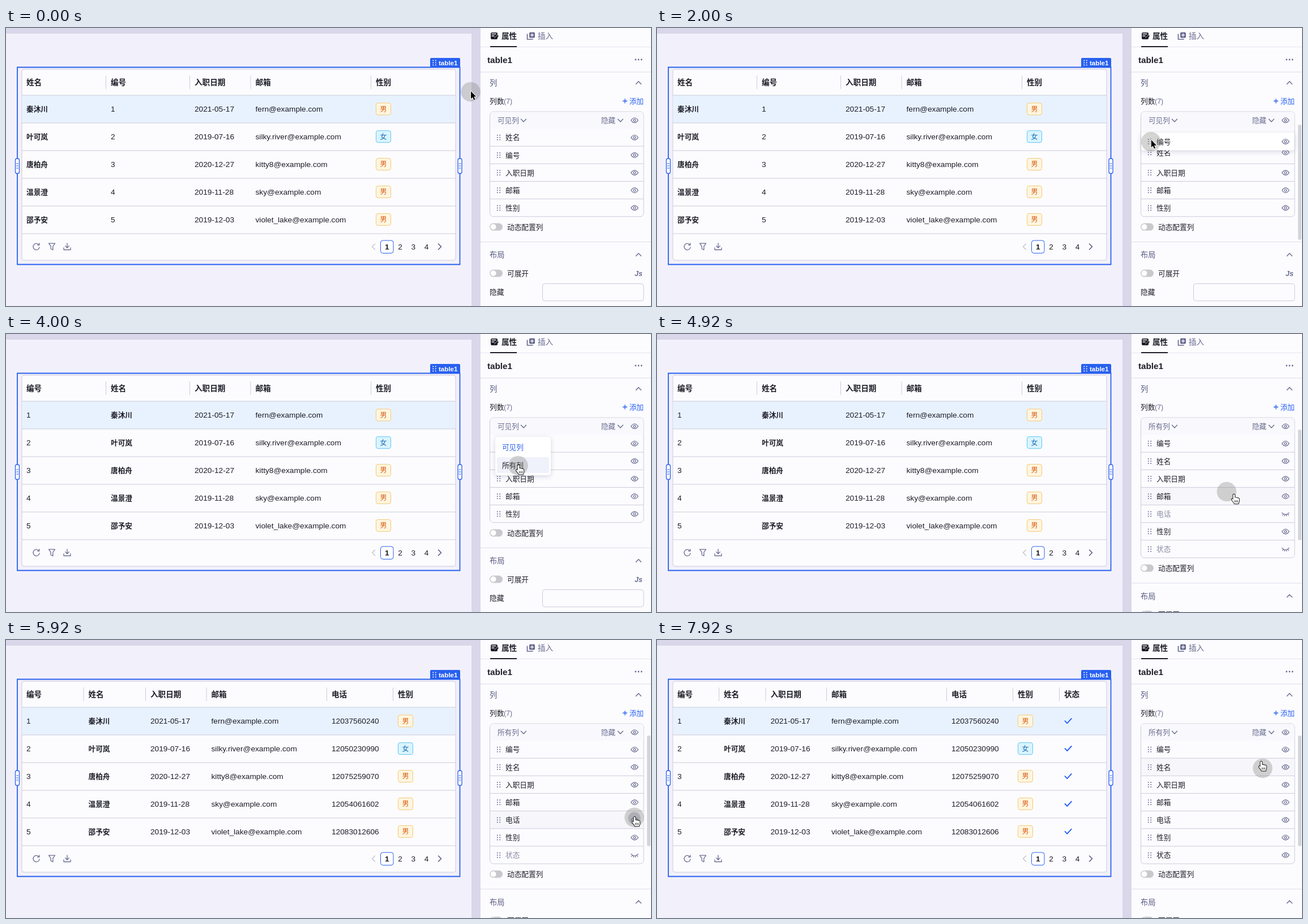
These frames come from a looping animation (1139x492 px, 8 s). An HTML page with a canvas:

```html
<!DOCTYPE html>
<html lang="zh-CN">
<head>
<meta charset="utf-8">
<title>table1</title>
<style>
  html, body { margin: 0; width: 100%; height: 100%; overflow: hidden; }
  canvas { display: block; width: 100vw; height: 100vh; }
</style>
</head>
<body>
<canvas id="stage"></canvas>
<script>
const W = 1139, H = 492, LOOP = 8000;
const FONT = '"Liberation Sans", "Noto Sans CJK SC", "Noto Sans CJK", sans-serif';
const BLUE = '#2860f0', INK = '#1d1d27', MUTED = '#6a6c90', FAINT = '#8b8ca3', LINE = '#cbcbd9', PAPER = '#fcfcff';

const canvas = document.getElementById('stage');
const ctx = canvas.getContext('2d');
const ratio = window.devicePixelRatio || 1;
canvas.width = W * ratio;
canvas.height = H * ratio;

// Moments (ms) at which the interface reacts
const AT = { grab: 1670, drop: 2300, reorder: 2420, open: 3150, pick: 4200, phone: 5670, phoneColumn: 5750, status: 7170 };

const ROW = 31.15, LIST_TOP = 178;
const LABELS = { name: '姓名', id: '编号', date: '入职日期', mail: '邮箱', phone: '电话', sex: '性别', status: '状态' };
const PEOPLE = [
  ['秦沐川', '2021-05-17', 'fern@example.com', '12037560240', '男'],
  ['叶可岚', '2019-07-16', 'silky.river@example.com', '12050230990', '女'],
  ['唐柏舟', '2020-12-27', 'kitty8@example.com', '12075259070', '男'],
  ['温景澄', '2019-11-28', 'sky@example.com', '12054061602', '男'],
  ['邵予安', '2019-12-03', 'violet_lake@example.com', '12083012606', '男'],
].map(([name, date, mail, phone, sex], i) => ({ id: String(i + 1), name, date, mail, phone, sex }));

const LAYOUTS = {
  start:  { name: 36, id: 185, date: 333, mail: 440.5, sex: 653 },
  moved:  { id: 36, name: 185, date: 333, mail: 440.5, sex: 653 },
  phone:  { id: 36, name: 145.5, date: 255, mail: 362.5, phone: 575, sex: 692 },
  status: { id: 36, name: 118, date: 200.5, mail: 308, phone: 520, sex: 637, status: 719 },
};

const EASE = {
  in: u => u * u,
  out: u => 1 - (1 - u) ** 2,
  both: u => u * u * (3 - 2 * u),
};
// Pointer path: time, x, y, easing of the way there
const PATH = [
  [0, 821, 112], [500, 821, 112], [970, 872, 222, 'both'],
  [1670, 872, 222], [2150, 873, 191, 'both'],
  [2480, 873, 191], [2900, 910.5, 172, 'both'],
  [3250, 910.5, 172], [3650, 905, 232, 'both'],
  [4500, 905, 232], [4920, 1018.5, 283.5, 'in'], [5350, 1110, 313, 'out'],
  [6250, 1110, 313], [6850, 1110, 373, 'both'],
  [7270, 1110, 373], [7920, 1067, 215, 'in'], [8000, 1067, 215],
];

function pointerAt(t) {
  const i = Math.max(1, PATH.findIndex(key => key[0] >= t));
  const [t0, x0, y0] = PATH[i - 1], [t1, x1, y1, ease = 'both'] = PATH[i];
  const u = EASE[ease](Math.min(1, Math.max(0, (t - t0) / (t1 - t0))));
  return { x: x0 + (x1 - x0) * u, y: y0 + (y1 - y0) * u };
}

function text(str, x, cy, size, color = INK, weight = 400, align = 'left') {
  ctx.font = `${weight} ${size}px ${FONT}`;
  ctx.textAlign = align;
  ctx.fillStyle = color;
  ctx.fillText(str, x, cy + size * 0.365);
}

function rect(x, y, w, h, color) {
  ctx.fillStyle = color;
  ctx.fillRect(x, y, w, h);
}

function box(x, y, w, h, r, fill, stroke, width = 1) {
  ctx.beginPath();
  ctx.roundRect(x, y, w, h, r);
  if (fill) { ctx.fillStyle = fill; ctx.fill(); }
  if (stroke) { ctx.strokeStyle = stroke; ctx.lineWidth = width; ctx.stroke(); }
}

function disc(x, y, r, color) {
  ctx.beginPath();
  ctx.arc(x, y, r, 0, Math.PI * 2);
  ctx.fillStyle = color;
  ctx.fill();
}

function icon(d, x, y, stroke, width = 1.3, fill) {
  const path = new Path2D(d);
  ctx.save();
  ctx.translate(x, y);
  ctx.lineWidth = width;
  ctx.lineJoin = ctx.lineCap = 'round';
  ctx.strokeStyle = stroke;
  ctx.stroke(path);
  if (fill) { ctx.fillStyle = fill; ctx.fill(path); }
  ctx.restore();
}

function grip(x, y, color) {
  for (let i = 0; i < 6; i++) disc(x + (i % 2 ? 2.2 : -2.2), y + (Math.floor(i / 2) - 1) * 4, 1, color);
}

function eye(x, y, open) {
  if (open) {
    icon('M-6.3 0Q0 -8.6 6.3 0Q0 8.6 -6.3 0Z', x, y, MUTED, 1.2);
    icon('M-2 0A2 2 0 1 0 2 0A2 2 0 1 0 -2 0Z', x, y, MUTED, 1.2);
  } else {
    icon('M-6.3 -2Q0 4.6 6.3 -2M-4 .4L-5.3 2.6M-1.3 1.4L-1.8 3.6M1.3 1.4L1.8 3.6M4 .4L5.3 2.6', x, y, MUTED, 1.2);
  }
}

const chevronDown = (x, y) => icon('M-4.5 -2.2L0 2.4L4.5 -2.2', x, y, MUTED, 1.4);
const chevronUp = (x, y) => icon('M-4.5 2.2L0 -2.4L4.5 2.2', x, y, MUTED, 1.4);

function toggle(y) {
  box(854, y - 6.5, 23, 13, 6.5, '#c9c9cd');
  disc(860.5, y, 5, '#fff');
}

function genderTag(value, x, cy) {
  const [fill, edge, ink] = value === '男' ? ['#fff6df', '#f6c878', '#d85a14'] : ['#daf4ff', '#62c6f3', '#1268b4'];
  box(x + .5, cy - 10.5, 26, 21, 3.5, fill, edge);
  text(value, x + 13.5, cy, 12, ink, 400, 'center');
}

function drawCell(key, person, x, cy) {
  if (key === 'sex') genderTag(person.sex, x, cy);
  else if (key === 'status') icon('M-5.5 0L-1.7 4L5.8 -4.2', x + 7, cy, BLUE, 1.9);
  else if (key === 'name') text(person.name, x, cy, 12.7, INK, 700);
  else text(person[key], x, cy, 13.7);
}

function drawTable(layout) {
  rect(0, 0, W, H, '#d9d7e9');
  rect(0, 10, 822, H, '#f2f1fb');

  box(28, 73, 766, 338, 4, PAPER, LINE);
  rect(28.5, 119, 765, 49, '#e8f2ff');
  for (let i = 0; i < 6; i++) rect(28, 118.5 + i * 49, 766, 1, LINE);

  for (const [key, x] of Object.entries(layout)) {
    if (x > 36) rect(x - 9, 84, 1, 24, LINE);
    text(LABELS[key], x, 96, 13.6, INK, 700);
    PEOPLE.forEach((person, i) => drawCell(key, person, x, 143.3 + i * 48.9));
  }

  icon('M4.7 -3.2A5.6 5.6 0 1 0 5.6 1M5.3 -6V-2.8H2', 53.5, 387, MUTED);
  icon('M-5.5 -5.8H5.5L1.8 -.6V5.8L-1.8 3.8V-.6Z', 81, 387, MUTED);
  icon('M0 -6V1.8M-3.4 -1.4L0 2L3.4 -1.4M-6 2V5.5H6V2', 108, 387, MUTED);
  icon('M2.5 -5L-2.5 0L2.5 5', 649, 387, '#c3c3cf', 1.4);
  icon('M-2.5 -5L2.5 0L-2.5 5', 766, 387, '#55577f', 1.5);
  box(661.5, 376, 22.5, 22.5, 4, '#fff', BLUE);
  ['1', '2', '3', '4'].forEach((n, i) => text(n, 672.7 + i * 23.3, 387, 13.7, INK, i ? 400 : 700, 'center'));

  box(20, 69.5, 781.5, 349, 0, null, BLUE, 1.8);
  box(749, 53, 53, 17, [2, 2, 0, 0], BLUE);
  grip(756.5, 61.5, '#fff');
  text('table1', 764, 61.5, 11.6, '#fff', 700);
  for (const x of [20, 801.5]) {
    box(x - 3.5, 231, 7, 26.5, 3, '#fff', BLUE, 1.3);
    for (const y of [240, 244, 248]) rect(x - 2, y - .5, 4, 1, BLUE);
  }
}

function drawListRow(key, y, hidden) {
  grip(870, y, MUTED);
  text(LABELS[key], 882, y, 12.7, hidden ? FAINT : INK);
  eye(1110, y, !hidden);
}

function drawList(t, pointer) {
  const expanded = t >= AT.pick;
  const dragging = t >= AT.grab && t < AT.drop;
  const first = t < AT.drop ? ['name', 'id'] : ['id', 'name'];
  const keys = [...first, 'date', 'mail', ...(expanded ? ['phone', 'sex', 'status'] : ['sex'])];
  const bottom = LIST_TOP + keys.length * ROW;
  const hidden = key => (key === 'phone' && t < AT.phone) || (key === 'status' && t < AT.status);
  const menuOpen = t >= AT.open && !expanded;
  const hovered = pointer.x > 855 && !dragging && !menuOpen ? Math.floor((pointer.y - LIST_TOP) / ROW) : -1;

  box(854.5, 148, 271.5, bottom - 148, 6, PAPER, LINE);
  box(855, 148.5, 270.5, 29.5, [5, 5, 0, 0], '#f9f9fd');
  text(expanded ? '所有列' : '可见列', 868, 163.3, 12.6, MUTED);
  chevronDown(914, 163.5);
  text('隐藏', 1051, 163.3, 12.6, MUTED);
  chevronDown(1085, 163.5);
  eye(1110, 163.3, true);

  keys.forEach((key, i) => {
    const top = LIST_TOP + i * ROW;
    if (i === hovered) rect(855, top, 270.5, ROW - 1, '#f7f7fb');
    if (i) rect(854.5, top - .5, 271.5, 1, LINE);
    if (dragging && key === 'id') return;
    const shift = dragging && key === 'name' ? ROW * EASE.both(Math.min(1, Math.max(0, (t - 1850) / 200))) : 0;
    drawListRow(key, top + 15.8 + shift, hidden(key));
  });

  if (dragging) {
    const y = LIST_TOP + ROW + pointer.y - 222;
    shadowed(() => box(855, y, 270.5, ROW, 3, '#fff'));
    drawListRow('id', y + 15.8, false);
  }
  return bottom;
}

function shadowed(draw) {
  ctx.save();
  ctx.shadowColor = 'rgba(50, 50, 90, .2)';
  ctx.shadowBlur = 8 * ratio;
  ctx.shadowOffsetY = 2 * ratio;
  draw();
  ctx.restore();
}

function drawMenu(pointer) {
  shadowed(() => box(864, 182, 98, 68, 5, '#fff'));
  const active = pointer.y > 216 ? 1 : 0;
  rect(867, active ? 218 : 186, 92, 28, '#f0f2fb');
  text('可见列', 876, 200, 12.6, BLUE);
  text('所有列', 876, 232, 12.6);
}

function drawPanel(t, pointer) {
  rect(838, 0, W - 838, H, PAPER);

  box(856, 8, 12, 12, 2, INK);
  icon('M-4 -2.5H3M-4 1H0M1 4.5L6 -.5', 862, 13, PAPER, 1.3);
  icon('M1 6L1.6 3.6L6 -.8L7.5 .7L3.2 5.2Z', 862, 13.5, INK, 1, INK);
  text('属性', 875, 14.5, 13.6, INK, 700);
  icon('M-6 -2.5V6.5H3.5', 926.5, 13.5, MUTED, 1.7);
  box(924, 7.5, 10, 10, 2, MUTED);
  icon('M-2.5 0H2.5M0 -2.5V2.5', 929, 12.5, PAPER, 1.3);
  text('插入', 939, 14.5, 13.6, MUTED);
  rect(838, 33, W - 838, 1, '#e4e3ee');
  rect(855, 32, 47, 2, INK);

  text('table1', 850, 56.5, 15.2, INK, 700);
  for (let i = -1; i < 2; i++) disc(1117 + i * 5.2, 56, 1.4, MUTED);
  rect(838, 77.5, W - 838, 1, '#dddce9');

  text('列', 854, 97.3, 13.2, '#55577f');
  chevronUp(1117, 97);
  text('列数', 854, 129.3, 12.7);
  text('(7)', 879, 129.3, 12.4, MUTED);
  icon('M-3.5 0H3.5M0 -3.5V3.5', 1093, 129.3, BLUE, 1.4);
  text('添加', 1126, 129.3, 12.7, BLUE, 400, 'right');

  const bottom = drawList(t, pointer);
  toggle(bottom + 18.3);
  text('动态配置列', 885, bottom + 18.5, 12.7);
  rect(838, bottom + 44.3, W - 838, 1, '#dddce9');
  text('布局', 854, bottom + 67.8, 13.2, '#55577f');
  chevronUp(1117, bottom + 67.5);
  toggle(bottom + 100.3);
  text('可展开', 885, bottom + 100.5, 12.7);
  text('Js', 1110, bottom + 100.3, 12.5, MUTED, 'italic 700');
  text('隐藏', 854, bottom + 133.8, 12.7);
  box(947.5, bottom + 118.7, 178.5, 30.5, 4, PAPER, LINE);

  if (t >= 850 && t < 2600) box(1132, 171, 6, 204, 3, '#d4d4db');
  else if (t >= AT.pick + 100) box(1132, 169, 6, 196, 3, '#d4d4db');
  if (t >= AT.open && t < AT.pick) drawMenu(pointer);
}

function drawPointer(t, pointer) {
  const halo = pointerAt(Math.max(0, t - 24));
  if (pointer.x > 1098) disc(1109.5, Math.round((pointer.y - LIST_TOP) / ROW - .5) * ROW + LIST_TOP + 13, 11, 'rgba(90, 95, 130, .3)');
  disc(halo.x - .5, halo.y + 1, 17.3, 'rgba(125, 125, 118, .33)');
  if (t < 2600) {
    icon('M0 0V13.3L3 10.5L5.2 15.4L7.4 14.4L5.2 9.6H9.3Z', pointer.x, pointer.y, '#fff', 2, '#000');
  } else {
    icon('M-1.5 1.5C-1.5 -.5 1.5 -.5 1.5 1.5V6.3C2 5.4 4.1 5.5 4.3 6.7C4.9 5.9 6.7 6.2 6.9 7.4C7.6 6.7 9.2 7.2 9.2 8.5V11.2C9.2 13.6 8 14.3 7.8 16.6H.7C.4 14.6 -2.8 12 -3.9 10C-4.8 8.3 -3.2 7.6 -2.2 8.7L-1.5 9.5Z',
      pointer.x, pointer.y, '#111', 1.9, '#fff');
    icon('M1.6 11V14M4 11V14M6.4 11V14', pointer.x, pointer.y, '#111', .9);
  }
}

function layoutAt(t) {
  if (t >= AT.status) return LAYOUTS.status;
  if (t >= AT.phoneColumn) return LAYOUTS.phone;
  return t >= AT.reorder ? LAYOUTS.moved : LAYOUTS.start;
}

const begin = performance.now();
function frame() {
  const t = (performance.now() - begin) % LOOP;
  const pointer = pointerAt(t);
  ctx.setTransform(ratio, 0, 0, ratio, 0, 0);
  drawTable(layoutAt(t));
  drawPanel(t, pointer);
  drawPointer(t, pointer);
  requestAnimationFrame(frame);
}
frame();
</script>
</body>
</html>
```
